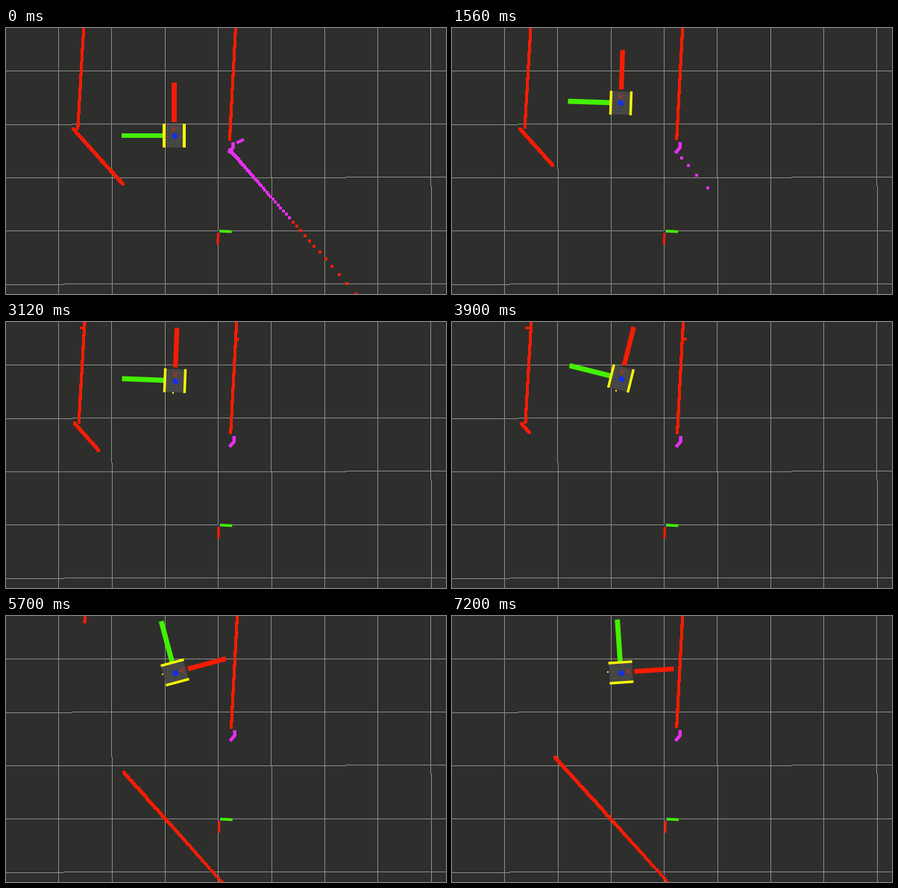
A matplotlib script for the animation above (7260 ms loop, 590 px wide and 356 px high).

```python
import numpy as np
import matplotlib.pyplot as plt
from matplotlib.animation import FuncAnimation
from matplotlib.patches import Polygon

W, H, DPI = 590, 356, 100
FRAMES, STEP = 121, 60
PX = 72 / DPI

BG, GRID = "#2e2e2d", "#8a8a88"
RED, GREEN, MAGENTA = "#f51d02", "#44f000", "#e92ef0"
YELLOW, BLUE, BODY = "#fbfb08", "#1030f0", "#454545"

BEAMS = np.radians(131.64 + 0.385 * np.arange(-697, 8))
LIDAR = 8             # lidar offset ahead of the base
CELL, TILT = 71.33, 0.0009
EMPTY = np.empty((0, 2))

fig = plt.figure(figsize=(W / DPI, H / DPI), dpi=DPI, facecolor=BG)
ax = fig.add_axes([0, 0, 1, 1])
ax.set_xlim(0, W)
ax.set_ylim(H, 0)
ax.axis("off")


def stroke(color, width, z, xs=(), ys=(), **kw):
    return ax.plot(xs, ys, color=color, lw=width * PX, zorder=z, **kw)[0]


def dots(color, size, z, marker="s"):
    return ax.plot([], [], ls="", marker=marker, ms=size * PX, color=color,
                   mew=0, zorder=z)[0]


def place(line, pts):
    line.set_data(*np.asarray(pts).T)


# slightly rotated grid, each line stepping on whole pixels
for k in range(8):
    y = np.arange(H + 1)
    x = np.round(70 + CELL * k + TILT * y) + 0.5
    stroke(GRID, 1, 1, x, y, snap=False)
for k in range(5):
    x = np.arange(W + 1)
    y = np.round(57.25 + CELL * k - TILT * x) + 0.5
    stroke(GRID, 1, 1, x, y, snap=False)


def bump(t, mid, width):
    return np.exp(-((t - mid) / width) ** 2)


def pose(t):
    """Base position and heading, clockwise from up: brake, then turn."""
    x = 225.5 + min(0.6 * t, 1)
    y = 75.5 + 68.5 * max(1 - t / 4, 0) ** 2.05
    turn = 1.2 * min(t, 1.85)
    turn += 87.8 * (1 - np.exp(-0.9 * max(t - 3.74, 0)))
    return np.array([x, y]), np.radians(turn)


def to_stage(pts, pos, turn):
    """Robot frame (right, ahead) to stage pixels."""
    r, f = np.asarray(pts, float).T
    c, s = np.cos(turn), np.sin(turn)
    return np.column_stack([pos[0] + r * c + f * s, pos[1] + r * s - f * c])


def cross(a, b):
    return a[0] * b[1] - a[1] * b[0]


def scan(eye, turn, p, q):
    """Points where the beams meet the front side of wall p-q."""
    p, v = np.array(p), np.subtract(q, p)
    side = cross(p - eye, v)
    if side <= 0:
        return EMPTY
    a = BEAMS + turn
    u = np.array([np.sin(a), -np.cos(a)])
    den = cross(u, v)
    u, den = u[:, den > 1e-9], den[den > 1e-9]
    s = cross(p - eye, u) / den
    s = s[(s >= 0) & (s <= 1)]
    return p + s[:, None] * v


def box(x0, x1, y0, y1):
    return [(x0, y0), (x1, y0), (x1, y1), (x0, y1)]


PARTS = [
    (box(-12.5, 12.5, -15.5, 15.5), BODY),
    (box(-71, -14, -3.4, 3.4), GREEN),
    (box(-3.2, 3.2, 18, 71), RED),
    (box(-15.2, -11.8, -16, 16), YELLOW),
    (box(11.8, 15.2, -16, 16), YELLOW),
]
polys = [Polygon(b, closed=True, fc=c, ec="none", zorder=5) for b, c in PARTS]
for poly in polys:
    ax.add_patch(poly)

rng = np.random.default_rng(4)
speck = [(x, y) for x in range(-10, 11, 4) for y in range(-13, 14, 4)]
axes_pts = rng.normal((0, 9), (2, 2.5), (16, 2))
speck_dots = dots("#585858", 1.2, 6)
axes_dots = dots("#a83a28", 1.4, 7)
rear_dot = dots(YELLOW, 2, 7)
hub = dots(BLUE, 7.5, 8, "o")

red_hits = dots(RED, 3.5, 3)
mag_hits = dots(MAGENTA, 3.5, 4)
hook = stroke(MAGENTA, 4.5, 4)
stray = stroke(MAGENTA, 4, 4)
ticks = [stroke(RED, 3.5, 3) for _ in range(2)]
origin_red = stroke(RED, 3.2, 4, solid_capstyle="butt")
origin_green = stroke(GREEN, 3.6, 4, solid_capstyle="butt")
origin_hub = dots("#2a2a90", 3, 3)


def draw(i):
    t = i * STEP / 1000
    pos, turn = pose(t)
    eye = to_stage([(0, LIDAR)], pos, turn)[0]

    # the localisation drifts sideways, most of all during the turn
    settle = min(t / 1.5, 1)
    drift = 1.3 * settle + 3 * bump(t, 4.8, 0.8)
    left, right = 104.3 + drift, 308 + drift
    corner = 90 + drift - max(t - 4.8, 0)
    end = 300 - 1.5 * settle
    reds = [scan(eye, turn, (left - 8, 134), (left, -2)),
            scan(eye, turn, (293, 360), (corner, 135)),
            scan(eye, turn, (right, -2), (right - 8.1, 149))]
    far = scan(eye, turn, (end, 163), (end + 175, 362.2))
    near = far[:, 0] < 383
    place(red_hits, np.vstack(reds + [far[~near]]))
    place(mag_hits, far[near])

    h = 304.5 + drift
    place(hook, [(h, 155), (h, 160), (h - 4.8, 165.5)])
    n = 6 * (1 - t / 0.6)
    place(stray, [(311, 153), (311 + n, 153 - n / 2)] if n > 0 else EMPTY)

    n = 6 * bump(t, 3.9, 1.3)
    show = n > 0.5
    place(ticks[0], [(left - 0.5 - n, 8), (left - 0.5, 8)] if show else EMPTY)
    place(ticks[1], [(right - 1, 23), (right - 1 + 0.7 * n, 23)]
          if show else EMPTY)

    ox = 284.6 + 0.2 * t
    place(origin_red, [(ox, 274), (ox - 0.8 + 0.1 * t, 290)])
    place(origin_green, [(ox + 1.5, 271.8), (ox + 18, 272.6)])
    place(origin_hub, [(ox, 272)])

    for poly, (pts, _) in zip(polys, PARTS):
        poly.set_xy(to_stage(pts, pos, turn))
    place(speck_dots, to_stage(speck, pos, turn))
    place(axes_dots, to_stage(axes_pts, pos, turn))
    place(rear_dot, to_stage([(-2, -17)], pos, turn) if t > 2 else EMPTY)
    place(hub, [pos])
    return ()


anim = FuncAnimation(fig, draw, frames=FRAMES, interval=STEP, repeat=True,
                     repeat_delay=0, init_func=lambda: draw(0), blit=False)
plt.show()
```
